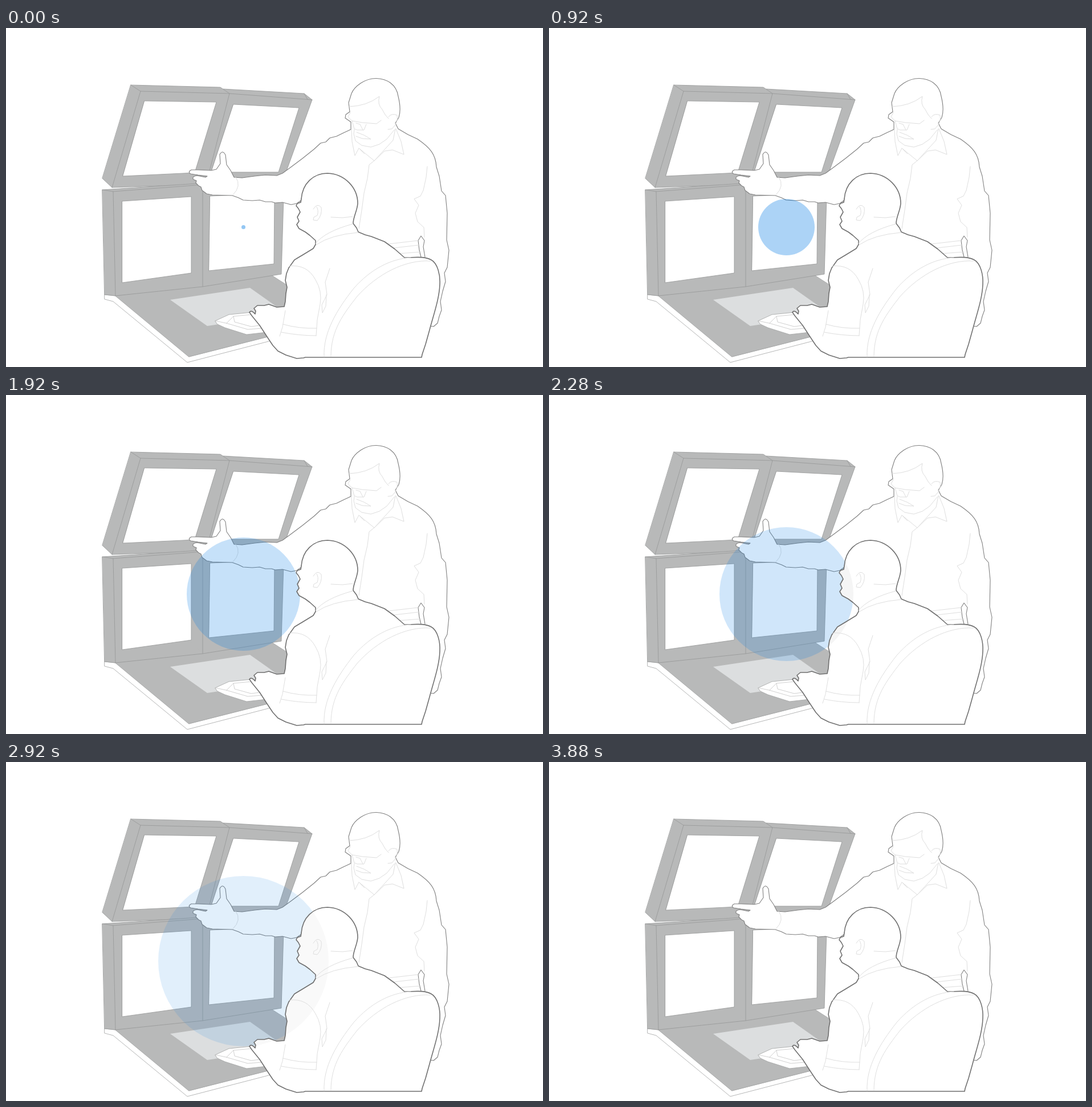
Animation of 942x595 px, one loop 4 s. Source, as an HTML page without scripts:

```html
<!DOCTYPE html>
<html lang="en">
<head>
<meta charset="utf-8">
<title>Control room pulse</title>
<style>
  html, body { margin: 0; width: 100%; height: 100%; overflow: hidden; background: #fff; }
  svg { display: block; width: 942px; height: 595px; }
  path { stroke-linejoin: round; stroke-linecap: round; }
  .case path { fill: #b8b9b9; stroke: #969797; stroke-width: .8; }
  .case .glass { fill: #fff; }
  .desk path { stroke: #a3a4a4; stroke-width: .8; fill: #fff; }
  .desk .top { fill: #b8b9b9; }
  .desk .pad { fill: #dcdedf; stroke: none; }
  .desk .fine { fill: none; stroke: #c4c4c4; }
  .body { fill: #fff; stroke: #808080; stroke-width: 1.1; }
  .seated { stroke: #707070; stroke-width: 1.6; }
  .fine { fill: none; stroke: #dedede; stroke-width: 1; }
  .pulse { fill: #067de5; animation: grow 4s steps(97, end) infinite; }
  .ghost { fill: #000; }
  /* the ring keeps a faint tint until it drops out just before the loop ends */
  @keyframes grow {
    from { r: 3.5px; opacity: .43; }
    96.99% { r: 197.5px; opacity: .013; }
    97%, to { r: 197.5px; opacity: 0; }
  }
</style>
</head>
<body>
<svg viewBox="0 0 942 595">
  <defs>
    <path id="sitter" d="M518 300C520 273 539 255 564 255C594 256 617 280 617 308C616 321 609 332 609 343
      L615 351 618 358 630 363 641 366 664 375 682 388 699 403
      C716 403 733 400 746 407C757 413 762 433 761 450C760 475 751 500 743 530
      L736 555 730 573 729 578H525L522 579 510 580 491 574 477 567 468 557 460 545 445 522 432 506 427 499
      Q430 494 437 502L438 497 435 492 441 487 453 487 461 485 475 490 488 489
      490 480 491 466 493 455 490 443 492 431 496 421 506 407 521 398 539 387 543 380 543 373
      533 364 525 358 514 352 510 345 514 339 511 332 516 323 513 317 509 312 511 308 517 306Z"/>
    <clipPath id="front"><use href="#sitter"/></clipPath>
  </defs>

  <g class="case">
    <path d="M381 107L523 115 537 126 488 262 352 264Z"/>
    <path d="M392 115L537 126M523 115L529 125.5"/>
    <path class="glass" d="M399 134L514 140 478 253H360Z"/>
    <path d="M219 100L376 104 392 115 351 274 186 280 169 264Z"/>
    <path d="M219 100L236 111 392 115M236 111L186 280"/>
    <path class="glass" d="M243 128L369 130 331 254 205 260Z"/>
  </g>

  <g class="desk">
    <path d="M173 468L192 470 321 577 530 524V532L318 587 188 480 173 476Z"/>
    <path class="top" d="M192 470L466 434 530 475V524L321 577Z"/>
    <path class="pad" d="M288 477L428 456 493 502 353 523Z"/>
    <path d="M367 514L391 503 431 499 475 532 422 538 384 526 371 520Z"/>
    <path class="fine" d="M367 514L386 518 424 529 462 526M387 518L399 506 431 503M399 506L401 516 430 524 453 521"/>
  </g>

  <g class="case">
    <path d="M169 284L335 273 345 275 488 262 483 432 345 454 192 470 173 468Z"/>
    <path d="M169 284L188 287 345 275V454M188 287L192 470"/>
    <path class="glass" d="M204 304L325 296V430L204 447Z"/>
    <path class="glass" d="M358 295L471 290 470 414 356 426Z"/>
  </g>

  <g>
    <path class="body" d="M360 250L337 249 325 249Q318 253 324 256L337 258 353 260 350 262 335 259Q325 261 329 266
      L334 268 333 272 338 277 342 279 344 285 352 291 362 293 397 294 408 298 416 302 432 303 445 302
      455 305 466 305 472 307 485 306 500 310 510 308 517 303 580 310 600 400 740 500 743 523
      750 524 757 518 760 506 764 495 762 480 766 462 771 445 769 430 774 420 777 390 773 372 774 325
      771 294 764 286 760 260 755 244C754 222 744 210 722 195L705 187 688 177 683 167 689 157
      C693 145 691 132 688 120C685 99 668 89 650 88.500C629 88 611 103 606 115
      L601 131 603 147 596 152 595 158 605 165 605 178 590 185 580 190 568 193 561 200 552 202 540 213
      520 229 500 244 485 255 475 259 455 258 436 260 414 263 400 262 394 250 387 240 385 223
      Q380 213 375 222L376 238 369 248Z"/>
    <path class="body" d="M735 402L732 384 734 373 728 365 723 373 725 390 728 402"/>
    <path class="fine" d="M602 138Q633 137 655 120Q651 134 660 143L665 152 671 159
      M671 156Q676 149 686 153Q689 165 677 177L670 178
      M604 148L600 156 607 163 625 166 650 168 658 162M607 163L611 177 616 179 628 179 632 169M614 167L621 169 626 179
      M615 183L628 188 640 195 625 194 614 190M611 178L610 186 613 198 624 206 640 209 655 204 668 195 681 179
      M606 178L607 199 612 224 619 211 646 233 664 216 678 214 698 222 693 199 684 177
      M619 211L629 221M683 177L679 197 646 233"/>
    <path class="fine" d="M646 233L637 240 634 264 628 290 624 320 619 352M739 243L737 262 732 285 727 295 716 300 724 311 718 325 722 340 733 350 734 367
      M663 380L723 373M672 387L724 381M688 396L728 393M403 262Q414 277 398 293"/>
  </g>

  <circle class="pulse" cx="416.5" cy="349.5" r="3.5"/>

  <use class="body seated" href="#sitter"/>
  <g clip-path="url(#front)" opacity=".22">
    <circle class="pulse ghost" cx="416.5" cy="349.5" r="3.5"/>
  </g>
  <path class="fine" d="M570 332L590 333 608 331M539 318Q546 306 553 315Q555 328 546 338L539 337 540 332 546 329Q549 320 545 314
    M543 378Q560 357 608 344M545 380Q570 363 617 359
    M497 418Q528 414 543 442Q555 462 551 485L546 512 544 540M490 496L485 525 480 541
    M486 520Q514 528 545 527M483 534Q514 540 544 540M568 422L560 446 563 468 554 486 555 500 561 488 562 468"/>
  <path class="fine" d="M558 577C556 535 580 495 610 457C640 423 675 405 710 403M570 576C570 530 592 502 616 471C651 432 700 406 745 409"/>
</svg>
</body>
</html>
```
